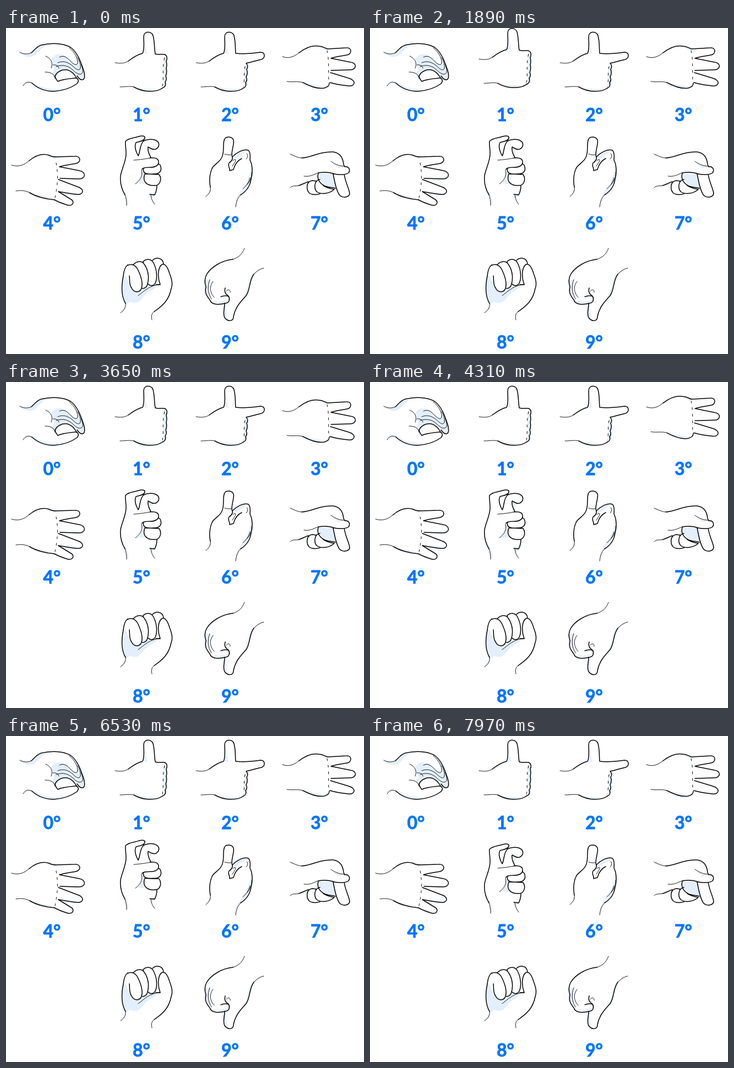
Recreate the animation shown at these times as an HTML page. Size 650 by 592 pixels, loop 8 s.

```html
<!DOCTYPE html>
<html lang="en">
<head>
<meta charset="utf-8">
<title>Counting on hands</title>
<style>
  html, body { margin: 0; width: 100%; height: 100%; overflow: hidden; background: #fff; }
  svg { display: block; width: 650px; height: 592px; }
  path { fill: none; stroke: #000; stroke-width: 1.5; stroke-linecap: round; stroke-linejoin: round; }
  .shade { fill: #e3effd; stroke: none; }
  .solid { fill: #fff; }
  .thin { stroke-width: .9; }
  .dash { stroke-width: 1; stroke-dasharray: 4 8; }
  text {
    font: bold 32px Lato, Carlito, "Open Sans", sans-serif;
    fill: #0075ff; stroke: #0075ff; stroke-width: .8; text-anchor: middle;
  }
</style>
</head>
<body>
<svg viewBox="0 0 650 592">
  <g class="hand">
    <path class="shade" d="M25 44C34 54 46 54 52 50C59 45 64 34 78 30C66 30 58 34 53 40C46 48 36 48 25 44Z"/>
    <path class="shade" d="M31 105C38 94 49 98 57 103C68 110 82 111 108 111C92 118 68 116 55 106C48 100 38 97 31 105Z"/>
    <path class="shade" d="M82 57C86 49 94 46 103 49C113 53 120 66 129 66C131 57 127 46 119 38C132 46 139 68 142 88C140 96 134 95 130 89C121 77 104 73 94 79C87 85 90 91 92 97C84 90 82 84 86 78C90 72 84 66 82 57Z"/>
    <path class="solid" d="M89 88C91 79 101 75 111 76C120 78 127 85 130 91L94 97Z" style="stroke:none"/>
    <path class="thin" d="M25 44C32 48 40 48 46 45M31 105C36 97 41 97 47 100M72 51C82 55 86 64 82 73M85 67C92 66 96 70 96 73M71 80C82 80 88 84 89 91"/>
    <path d="M46 45C52 40 55 34 64 31C82 27 103 27 117 35C130 44 136 62 141 77C144 88 143 94 138 94C134 94 131 90 129 87"/>
    <path class="thin" d="M97 53C106 48 112 55 118 61C123 66 128 69 130 64C131 56 125 44 115 36M94 63C106 58 115 64 121 69C127 75 133 79 135 73C136 68 134 60 130 54M91 70C104 65 115 70 121 76C128 83 135 87 139 81C140 77 138 70 136 66"/>
    <path d="M89 88C92 79 102 75 111 76C120 78 125 85 129 92"/>
    <path d="M47 100C58 110 70 115 87 115C102 114 118 109 129 101C134 95 130 90 124 91C114 92 102 93 94 97C92 94 90 92 89 88"/>
  </g>

  <g class="hand">
    <path class="shade" d="M230 107C245 110 256 111 276 111C264 118 244 117 230 107ZM286 54L291 52L291 105L286 106ZM248 46C252 43 253 36 253 30C256 38 254 44 258 47Z"/>
    <path class="thin" d="M198 63C209 65 216 64 222 60M207 107C217 107 224 105 232 107"/>
    <path d="M222 60C230 54 239 48 248 46C252 38 250 26 250 16C250 5 264 5 267 14C270 25 269 36 271 47C278 49 282 47 288 48C293 50 293 56 291 60C292 65 292 70 291 73C292 78 292 83 290 87C292 91 291 96 289 98C291 104 288 108 284 109"/>
    <path d="M232 107C239 111 250 115 261 115C271 115 279 113 284 109"/>
    <path class="dash" d="M288 54C283 72 287 87 284 106"/>
  </g>

  <g class="hand">
    <path class="shade" d="M377 107C392 110 403 111 423 111C411 118 391 117 377 107ZM433 68L438 68L438 104L432 106ZM395 46C399 43 400 36 400 30C403 38 401 44 405 47Z"/>
    <path class="thin" d="M345 63C356 65 363 64 369 60M354 107C364 107 371 105 379 107"/>
    <path d="M369 60C377 54 386 48 395 46C399 38 397 26 397 16C397 5 411 5 414 14C417 25 416 36 417 46C432 48 448 46 462 44C471 44 471 54 464 57C455 59 446 62 436 64C440 68 439 72 437 75C439 80 438 85 436 89C438 93 437 97 435 99C437 105 434 108 431 109"/>
    <path d="M379 107C386 111 397 115 408 115C418 115 426 113 431 109"/>
    <path class="dash" d="M434 70C431 82 434 92 431 106"/>
  </g>

  <g class="hand">
    <path class="shade" d="M533 97C546 101 560 104 579 106C565 114 549 106 533 97ZM566 33L588 37L580 41ZM590 78L626 75L624 77ZM590 99L622 104L621 106Z"/>
    <path class="thin" d="M502 52C513 56 522 53 532 45M510 97C520 99 530 96 539 99"/>
    <path d="M532 45C545 35 557 31 568 33C576 33 579 37 584 38L618 36C629 35 628 48 619 49C609 51 598 52 590 55L625 62C638 63 637 76 625 76L590 77M589 81L622 91C637 95 634 107 621 105C609 104 598 102 588 99"/>
    <path d="M539 99C554 107 568 111 578 109C584 107 587 105 587 100"/>
    <path class="dash" d="M583 41C587 59 585 79 586 97"/>
  </g>

  <g class="hand">
    <path class="shade" d="M37 297C50 302 68 305 88 310C70 313 52 309 37 297ZM70 230L94 234L89 238ZM98 275L134 273L130 276ZM96 295L130 301L126 304Z"/>
    <path class="thin" d="M10 249C23 253 33 249 42 241M18 296C29 294 37 296 43 299"/>
    <path d="M42 241C54 231 66 227 78 231C83 234 88 234 92 234L125 233C136 232 137 244 127 246C116 248 106 249 97 252L133 259C146 261 145 274 133 274L98 273M95 275L129 288C144 292 141 304 128 302C116 301 106 299 95 297L116 310C125 314 123 323 113 322C103 319 95 316 88 312"/>
    <path d="M43 299C54 306 73 311 88 312"/>
    <path class="dash" d="M91 245C95 265 94 285 89 308"/>
  </g>

  <g class="hand">
    <path class="shade" d="M212 292C218 300 223 308 222 319L219 321C220 312 217 303 212 292ZM262 303C268 302 269 298 272 292L270 303L264 309ZM246 259L250 262L252 283L238 282C246 275 248 268 246 259ZM258 218L264 220L263 234Z"/>
    <path class="thin" d="M219 322C219 314 218 308 216 303M263 303C264 312 267 316 270 320M246 258C249 269 243 277 235 283M232 240C243 239 253 238 262 236"/>
    <path d="M216 303C209 291 207 278 208 268C211 253 218 242 218 228C218 217 216 211 217 206C221 200 233 200 241 197C248 195 253 196 252 200C251 205 243 206 236 208C233 214 235 223 240 232C244 226 242 212 250 205"/>
    <path d="M250 205C257 202 267 201 272 204C280 208 279 216 272 220C266 222 262 218 258 216C257 222 260 230 263 235"/>
    <path class="solid" d="M252 265C247 279 256 287 270 286C281 286 283 273 278 266Z"/>
    <path class="solid" d="M250 254C247 264 256 266 267 265C280 266 284 258 280 249L275 245Z"/>
    <path class="solid" d="M261 236C270 235 276 236 277 242C278 250 270 253 262 253C254 253 247 254 247 257"/>
    <path d="M274 286C274 294 272 299 270 303C267 303 264 302 261 302"/>
  </g>

  <g class="hand">
    <path class="shade" d="M446 248C449 270 444 288 427 302C419 309 419 316 418 321C416 308 424 300 432 289C440 277 443 262 446 248ZM371 289C375 295 370 303 365 306C369 301 372 296 371 289ZM411 235C418 228 428 222 440 223L424 232L412 241Z"/>
    <path class="thin" d="M363 306C369 301 372 296 371 289M417 325C418 316 420 309 426 303M437 228C440 231 439 235 436 238M446 262C447 271 443 278 438 284M443 272C441 281 436 287 430 292M397 229C401 230 405 231 409 230"/>
    <path d="M371 289C368 274 371 259 376 252C383 244 392 241 394 228C396 217 393 204 399 199C408 196 415 200 413 210C412 220 408 228 411 235C412 240 408 243 405 245C402 251 407 254 406 259L413 257C415 249 420 241 428 237"/>
    <path d="M411 234C419 226 431 219 440 222C445 227 443 235 443 240C448 249 448 265 445 274C443 290 434 298 426 303"/>
    <path class="thin" d="M412 241C416 237 419 239 416 243L411 251"/>
  </g>

  <g class="hand">
    <path class="shade" d="M567 264L595 266L598 291C587 290 573 284 566 272ZM516 289C526 283 538 285 548 278L548 284C537 287 526 285 516 289ZM592 246C603 251 612 250 616 253L604 255Z"/>
    <path class="thin" d="M516 229C525 233 531 236 537 236M516 290C520 285 526 288 532 286M590 242C596 247 605 251 615 251M541 269C553 271 560 265 567 263"/>
    <path d="M537 236C553 236 569 224 594 225C607 227 612 237 613 248L615 252"/>
    <path class="solid" d="M594 265C597 281 600 296 606 304C612 309 622 308 624 301C623 291 616 281 614 265Z"/>
    <path class="solid" d="M567 263C579 261 588 262 596 265C605 267 617 267 622 263C626 257 622 251 615 252"/>
    <path class="solid" d="M556 277C544 279 545 294 551 300C557 304 568 303 574 299L563 278Z"/>
    <path class="solid" d="M570 275C559 277 559 291 564 297C571 303 588 301 596 293C589 292 581 289 576 286"/>
    <path d="M567 264C564 274 569 281 577 286C584 290 591 289 598 291M532 286C538 284 543 281 549 279"/>
  </g>

  <g class="hand">
    <path class="shade" d="M214 448C208 466 210 486 217 499C219 508 214 514 211 515C218 503 223 494 230 499C246 501 246 488 257 481C268 475 275 468 280 466L249 470L240 479C226 479 223 462 218 452Z"/>
    <path class="thin" d="M208 517C214 513 218 508 217 500M265 530C263 522 265 518 269 515M280 466C262 466 251 478 240 486"/>
    <path d="M217 500C208 485 210 465 213 450C214 440 216 434 221 430"/>
    <path d="M266 422C272 416 284 416 286 428"/>
    <path class="solid" d="M249 424C255 418 264 419 268 427C275 441 275 457 270 465C264 471 257 466 255 460Z"/>
    <path class="solid" d="M231 430C237 423 247 422 251 429C260 441 260 458 256 468C250 477 243 472 240 466Z"/>
    <path class="solid" d="M221 431C228 427 236 431 240 440C247 455 249 467 245 475C240 482 231 479 228 472C223 465 225 458 224 450"/>
    <path d="M272 466L280 466C275 453 275 434 284 429C291 428 295 439 297 446C302 458 303 466 300 473C296 494 285 504 269 515"/>
  </g>

  <g class="hand">
    <path class="shade" d="M362 458C361 470 362 482 370 493C367 482 367 471 370 457ZM376 495C385 498 395 497 404 493L398 500C389 502 381 500 376 495ZM397 500C400 503 399 515 402 529C393 522 396 511 397 500ZM467 436C451 442 445 455 442 472C440 482 434 488 430 492C437 480 438 470 440 463C443 450 452 440 467 436Z"/>
    <path class="thin" d="M433 400C429 411 422 417 412 420M468 436C462 437 456 441 450 447M370 457C365 470 367 482 373 492M376 460C368 470 371 482 378 489M400 478C403 473 408 476 407 480"/>
    <path d="M412 420C392 422 372 434 364 448C360 456 361 464 363 470C361 478 363 484 366 488C368 492 371 493 371 496C376 504 391 502 398 500C406 499 407 492 404 487C400 486 395 486 390 488"/>
    <path d="M398 472C396 479 398 483 404 487M397 500C397 510 393 519 397 526C403 534 413 533 413 524C416 507 427 496 436 486C444 474 441 459 450 447"/>
  </g>
</svg>
<script>
const svg = document.querySelector("svg");
const hands = [...document.querySelectorAll(".hand")];
const columns = [83.5, 246, 407, 569];
const spots = [[0, 0], [1, 0], [2, 0], [3, 0], [0, 1], [1, 1], [2, 1], [3, 1], [1, 2], [2, 2]];

spots.forEach(([col, row], n) => {
  const label = document.createElementNS("http://www.w3.org/2000/svg", "text");
  label.setAttribute("x", columns[col]);
  label.setAttribute("y", [169, 366, 582][row]);
  label.textContent = n + "°";
  svg.append(label);
});

// Hands hop in turn: start in ms, number of hops, height in px
const hops = [
  [370, 5, 7], [1440, 4, 10], [2360, 5, 10], [3500, 6, 10],
  [4820, 6, 10], [6140, 6, 10], [7460, 3, 10]
];
const LOOP = 8000, STEP = 30, HOP_STEPS = 6;

function draw(now) {
  const t = now % LOOP;
  hops.forEach(([start, count, height], n) => {
    const k = Math.floor((t - start) / STEP + 1e-6) + 1;
    const active = k > 0 && k < count * HOP_STEPS;
    const lift = active ? 1 - Math.abs(k % HOP_STEPS / 3 - 1) : 0;
    hands[n].setAttribute("transform", `translate(0 ${-height * lift})`);
  });
  requestAnimationFrame(draw);
}
draw(performance.now());
</script>
</body>
</html>
```
